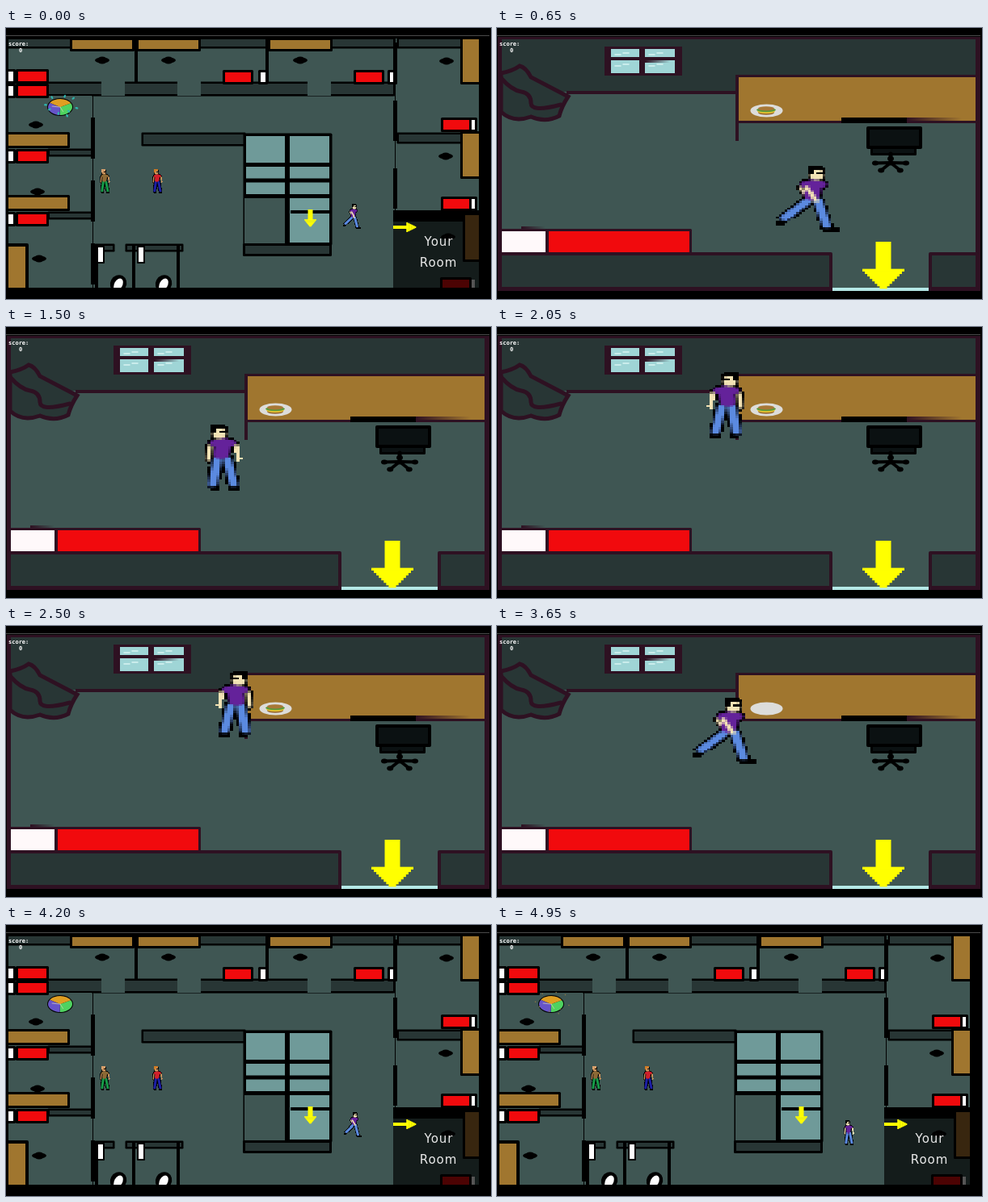
An HTML page with a canvas for the animation above (5 s loop, 600 px wide and 336 px high).

```html
<!DOCTYPE html>
<html lang="en">
<head>
<meta charset="utf-8">
<style>
html, body { margin: 0; height: 100%; overflow: hidden; background: #000; }
canvas { display: block; }
</style>
</head>
<body>
<canvas id="stage" width="600" height="336"></canvas>
<script>
const stage = document.getElementById('stage').getContext('2d');
let ctx = stage;
const FLOOR = '#3f5653', WALL = '#283635', WOOD = '#a0762f', RED = '#f10a0d', INK = '#000',
  GLASS = '#6f9a99', TRIM = '#2e1122', YELLOW = '#ffff00', SKIN = '#f3e3b5';
const LOOP = 5000, ENTER = 600, EAT = 2900, LEAVE = 4150;
const FIGURE_W = 24, FIGURE_H = 31;

function box(color, x, y, w, h) {
  ctx.fillStyle = color;
  ctx.fillRect(x, y, w, h);
}
function framed(color, x, y, w, h, edge = 3, line = INK) {
  ctx.fillStyle = line;
  ctx.beginPath();
  ctx.roundRect(x - edge, y - edge, w + edge * 2, h + edge * 2, edge / 2);
  ctx.fill();
  box(color, x, y, w, h);
}
function oval(color, x, y, rx, ry, tilt = 0) {
  ctx.fillStyle = color;
  ctx.beginPath();
  ctx.ellipse(x, y, rx, ry, tilt, 0, 7);
  ctx.fill();
}
function line(color, width, x1, y1, x2, y2) {
  ctx.strokeStyle = color;
  ctx.lineWidth = width;
  ctx.lineCap = 'round';
  ctx.beginPath();
  ctx.moveTo(x1, y1);
  ctx.lineTo(x2, y2);
  ctx.stroke();
}
function fade(x, y, w, h) {
  const g = ctx.createLinearGradient(x, 0, x + w, 0);
  g.addColorStop(0, TRIM);
  g.addColorStop(1, TRIM + '00');
  box(g, x, y, w, h);
}

// A person built from limbs; stride 0 stands, 1 takes a full step to the right.
function person(stride, { hair, skin, shirt, pants }) {
  const art = document.createElement('canvas');
  art.width = FIGURE_W;
  art.height = FIGURE_H;
  ctx = art.getContext('2d');
  const head = 10 + 5 * stride, body = 11.3 + 2.7 * stride, hip = body - .5;
  const backX = 7.8 - 5 * stride, footY = 29.3, backY = footY - 3.5 * stride;
  const frontX = 15 + 3.5 * stride;
  for (const grow of [1.6, 0]) {
    const paint = color => grow ? INK : color;
    line(paint(skin), 1.4 + grow, body - 4.5, 10, body - 5 + 4 * stride, 16);
    line(paint(pants), 3 + grow, hip - 1.5, 16, backX + stride, backY - 2);
    line(paint(pants), 3 + grow, hip + 2, 16, frontX, footY - 2);
    line(paint(shirt), 5.5 + grow, body, 9, hip, 13);
    line(paint(shirt), 3 + grow, body - 3, 8.5, body + 3, 8.5);
    oval(paint(skin), head, 4, 2.4 + grow / 2, 2.6 + grow / 2);
  }
  line(skin, 1.5, body + 4.5 - 7 * stride, 10, body + 5.5 - 4.5 * stride, 16);
  line(INK, 2, backX - stride, backY, backX + 1, backY);
  line(INK, 2, frontX - 1, footY, frontX + 1 + 3 * stride, footY);
  box(hair, head - 3, 0, 5, 2);
  box(hair, head - 3, 1, 2, 3);
  box(INK, head, 3, 3, 1);
  // harden the edges into square pixels
  const pixels = ctx.getImageData(0, 0, FIGURE_W, FIGURE_H);
  for (let i = 3; i < pixels.data.length; i += 4) pixels.data[i] = pixels.data[i] > 110 ? 255 : 0;
  ctx.putImageData(pixels, 0, 0);
  ctx = stage;
  return art;
}
const hero = { hair: INK, skin: SKIN, shirt: '#64229a', pants: '#5b8ae0' };
const standing = person(0, hero), walking = person(1, hero);
const neighbours = [
  person(0, { hair: '#d9a06d', skin: '#c9935c', shirt: '#8c6a35', pants: '#169a48' }),
  person(0, { hair: '#d07a24', skin: '#c9935c', shirt: '#d11f2b', pants: '#1c1fa5' })
];

function drawFigure(art, x, y, scaleX = 1, scaleY = 1) {
  ctx.save();
  ctx.imageSmoothingEnabled = false;
  ctx.translate(x, y);
  ctx.scale(scaleX, scaleY);
  ctx.drawImage(art, -FIGURE_W / 2, -FIGURE_H / 2);
  ctx.restore();
}

// Stops as [departure time, x, y]; the player walks to the next one at a fixed speed.
const toRoom = [[0, 428, 234], [ENTER, 477, 247]];
const inRoom = [[ENTER, 365, 213], [800, 400, 213], [1200, 268, 163], [1800, 271, 163],
  [1990, 288, 98], [3565, 281, 98], [3700, 282, 149], [LEAVE, 447, 268]];
const backOut = [[LEAVE, 425, 243], [LOOP, 436, 258]];

function drawPlayer(t, stops, speed, scaleX, scaleY) {
  let [, x, y] = stops[0], facing = 1, moving = false;
  for (let i = 1; i < stops.length && t >= stops[i - 1][0]; i++) {
    const [start, x0, y0] = stops[i - 1], dx = stops[i][1] - x0, dy = stops[i][2] - y0;
    const k = Math.min(1, (t - start) * speed / Math.hypot(dx, dy));
    x = x0 + dx * k;
    y = y0 + dy * k;
    facing = Math.sign(dx) || facing;
    moving = k < 1;
  }
  const stepping = moving && Math.floor(t / 150) % 2 === 0;
  drawFigure(stepping ? walking : standing, x, y, scaleX * facing, scaleY);
}

function arrow(x, y, length, half, thick, turn = 0) {
  const steps = 8, neck = length * .58, h = (length - neck) / steps;
  ctx.save();
  ctx.translate(x, y);
  ctx.rotate(turn);
  box(YELLOW, -thick / 2, 0, thick, neck + 1);
  for (let s = 0; s < steps; s++) {
    const w = half * (1 - s / (steps + .5));
    box(YELLOW, -w, neck + s * h, w * 2, h + .3);
  }
  ctx.restore();
}

function bed(x, y, pillowX) {
  framed('#fff', pillowX, y, 6, 12);
  framed(RED, x, y, pillowX < x ? 35 : 32, 12);
}
function seat(x, y) {
  oval(INK, x, y, 9, 3.5);
  oval(INK, x, y, 6, 4.5);
}
function strip(x, y, w, h) {
  framed(WALL, x, y, w, h, 2.5);
}

function drawWheel(t) {
  const x = 67, y = 98, phase = (t + 150) % 1000;
  oval(INK, x, y, 16, 11);
  ['#4fd260', '#6654c8', '#df9e22'].forEach((color, i) => {
    ctx.fillStyle = color;
    ctx.beginPath();
    ctx.moveTo(x, y);
    ctx.ellipse(x, y, 15, 10, 0, -.5 + i * 2.1, 1.6 + i * 2.1);
    ctx.fill();
    line('#d9d7b5', .7, x, y, x + 10 * Math.cos(i * 2.1 - .9), y + 6 * Math.sin(i * 2.1 - .9));
  });
  if (phase >= 300) return;
  const teal = phase >= 150;
  for (let i = 0; i < 9; i++) {
    const a = i * 2.4 + .8, reach = 1 + .2 * (i % 3) + (phase % 150) / 1000;
    oval(teal ? '#2fb5ad' : '#8d7a48', x + Math.cos(a) * 15 * reach,
      y - 2 + Math.sin(a) * 10 * reach, teal ? 2 : .8, teal ? 1.2 : .7, a);
  }
}

function drawTopRooms() {
  strip(3, 14, 476, 9);
  strip(3, 69, 476, 13);
  for (const x of [118, 212, 373]) box(FLOOR, x, 66, 29, 18);
  box(FLOOR, 3, 84, 103, 3);
  for (const x of [82, 164, 327]) {
    framed(WOOD, x, 15, 74, 11);
    seat(x + 37, 40);
  }
  for (const i of [0, 1]) {
    box(INK, 159 + 162 * i, 14, 4, 54);
    bed(271 + 162 * i, 55, 315 + 160 * i);
  }
}

function drawLeftRooms() {
  box(INK, 107, 84, 1, 238);
  bed(15, 54, 3);
  bed(15, 72, 3);
  for (const i of [0, 1, 2]) {
    const y = 132 + 78 * i;
    seat(37 + 2 * i, 120 + 78 * i + i * 5);
    box(INK, 105, y - 21, 5, 51);
    if (i === 2) break;
    framed(WOOD, 3, y, 73, 14);
    strip(54, y + 20, 51, 5);
    bed(15, y + 21, 3);
  }
  framed(WOOD, 3, 271, 21, 51, 4);
}

function drawRightRooms() {
  box(INK, 481, 13, 1, 225);
  for (const y of [18, 90, 174]) box(INK, 479, y, 5, 50);
  strip(486, 14, 78, 9);
  strip(486, 132, 76, 9);
  for (const y of [14, 131]) framed(WOOD, 565, y, 20, 53);
  for (const y of [114, 212]) bed(541, y, 574);
  seat(545, 41);
  seat(544, 159);
  box(INK, 479, 226, 106, 16);
  box('#141c1b', 479, 240, 106, 82);
  framed('#38260f', 568, 232, 17, 55);
  framed('#4c0303', 540, 312, 33, 10);
  box('#555', 576, 312, 4, 10);
  seat(547, 259);
  ctx.fillStyle = '#e8e8e8';
  ctx.textAlign = 'center';
  ctx.letterSpacing = '1px';
  ctx.font = '15px "DejaVu Sans", sans-serif';
  ctx.fillText('Your', 535.5, 270);
  ctx.fillText('Room', 535, 296);
  ctx.letterSpacing = '0px';
}

function drawBathrooms() {
  strip(112, 270, 20, 5);
  strip(150, 270, 67, 5);
  for (const x of [110, 156, 211]) box(INK, x, 268, 4, 54);
  for (const i of [0, 1]) {
    framed('#fff', 114 + 50 * i, 272, 6, 18, 2);
    oval(INK, 139 + 56 * i, 317, 10, 11, .5);
    oval('#fff', 139 + 56 * i, 318, 5, 8, .5);
  }
}

function drawStairs() {
  strip(170, 132, 124, 12);
  framed(GLASS, 297, 134, 103, 132, 3.5);
  box(FLOOR, 295, 210, 51, 57);
  for (const i of [0, 1, 2]) box(INK, 295, 167 + 19.5 * i, 106, 5);
  box(INK, 352, 226, 49, 4);
  box(INK, 345, 131, 6, 137);
  framed(WALL, 296, 270, 104, 10);
}

function drawMap(t) {
  box(FLOOR, 3, 13, 582, 309);
  box(INK, 109, 83.5, 370, .7);
  drawTopRooms();
  drawLeftRooms();
  drawRightRooms();
  drawBathrooms();
  drawStairs();
  box(INK, 0, 0, 3, 336);
  box(INK, 585, 0, 15, 336);
  box(INK, 0, 322, 600, 14);
  arrow(376.5, 225, 21, 7.5, 6);
  arrow(479, 247, 28, 6, 4, -Math.PI / 2);
  drawWheel(t);
  neighbours.forEach((art, i) => drawFigure(art, 123 + 65 * i, 190));
  drawPlayer(t, t < ENTER ? toRoom : backOut, .12, 1, 1.03);
}

function drawWindow() {
  box(TRIM, 133, 23, 96, 36);
  for (const x of [141, 183])
    for (const y of [26, 40]) {
      box('#9fd5d6', x, y, 37, y === 26 ? 10 : 16);
      for (const i of [0, 1]) line('#d9f3f2', 1.5, x + 5 + 10 * i, y + 7 - 2 * i, x + 12 + 10 * i, y + 7 - 2 * i);
    }
  box(TRIM, 176, 23, 7, 36);
  fade(183, 39, 31, 4);
}

function drawBlanket() {
  ctx.strokeStyle = TRIM;
  ctx.lineWidth = 5;
  ctx.fillStyle = WALL;
  const cloth = new Path2D('M5 56Q20 53 28 47Q36 49 42 61L88 85Q80 97 77 109Q60 118 42 110Q20 118 5 104Z');
  ctx.fill(cloth);
  ctx.stroke(cloth);
  ctx.stroke(new Path2D('M5 62Q18 77 30 79T42 93T79 95'));
}

function drawDesk(eaten) {
  box(TRIM, 295, 58, 4, 82);
  framed(WOOD, 299, 61, 293, 54, 3, TRIM);
  box(INK, 426, 111, 81, 7);
  fade(507, 111, 68, 5);
  oval('#dcdcda', 333.5, 102.5, 20, 8);
  if (eaten) return;
  ['#9a6a32', '#e8c52f', '#5a9a3c', '#a87838'].forEach((color, i) =>
    oval(color, 333, 105 - 1.7 * i, 10 + i % 3, 2.7));
}

function drawChair() {
  framed('#0b1112', 461, 126, 61, 20, 4);
  framed('#0b1112', 465, 150, 51, 5);
  line(INK, 5, 487, 156, 487, 168);
  for (let i = 0; i < 5; i++) {
    const a = i * Math.PI * .4 - Math.PI / 2;
    const x = 487 + 20 * Math.cos(a), y = 170 + 8 * Math.sin(a);
    line(INK, 4, 487, 167, x, y);
    oval(INK, x, y, 4, 3);
  }
}

function drawRoom(t) {
  box(TRIM, 1, 11, 597, 315);
  box(FLOOR, 6, 14, 586, 308);
  box(WALL, 6, 14, 586, 65);
  box(TRIM, 86, 78, 211, 4);
  drawWindow();
  drawBlanket();
  drawDesk(t >= EAT);
  drawChair();
  framed('#fff9fa', 6, 252, 54, 26, 3, TRIM);
  framed(RED, 64, 252, 174, 26, 3, TRIM);
  fade(30, 246, 30, 3);
  framed(WALL, 6, 282, 405, 39, 4, TRIM);
  framed(WALL, 538, 282, 54, 39, 4, TRIM);
  box('#b5e8e6', 415, 322, 119, 4);
  arrow(478, 265, 58, 26, 19);
  drawPlayer(t, inRoom, .386, 3.6, 2.74);
}

function draw() {
  const t = performance.now() % LOOP;
  box(INK, 0, 0, 600, 336);
  if (t >= ENTER && t < LEAVE) drawRoom(t);
  else drawMap(t);
  box('#4a4a4a', 0, 9, 598, 1);
  ctx.fillStyle = '#fff';
  ctx.textAlign = 'left';
  ctx.font = 'bold 7px "DejaVu Sans Mono", monospace';
  ctx.fillText('score:', 3, 22);
  ctx.fillText('0', 16, 30);
  requestAnimationFrame(draw);
}
draw();
</script>
</body>
</html>
```
